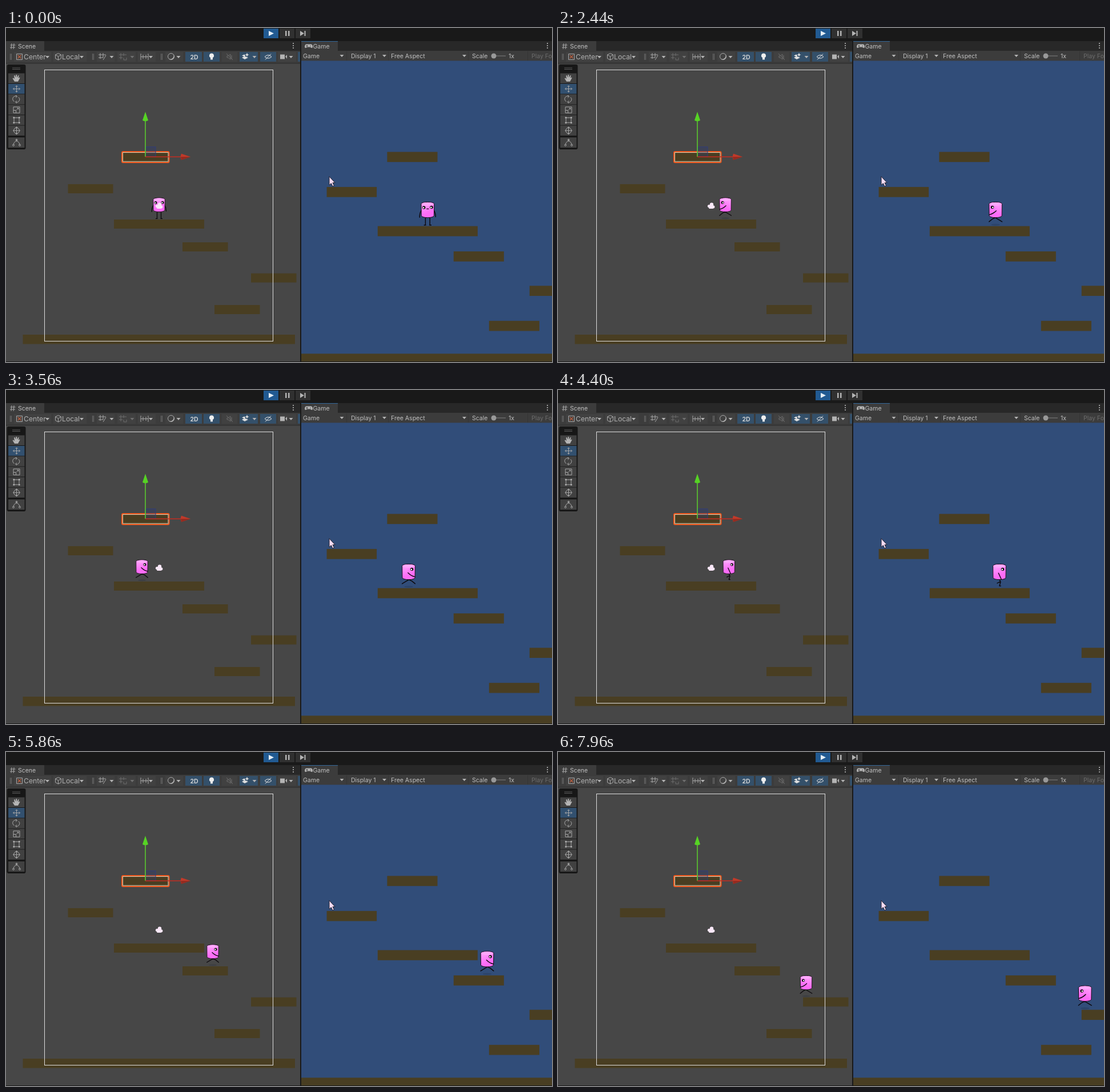
Animation, 956 px wide and 586 px high, one loop 8 s. Source, as an HTML page:

```html
<!DOCTYPE html>
<html lang="en">
<head>
<meta charset="utf-8">
<title>Platformer in the editor</title>
<style>
  html, body { margin: 0; width: 100%; height: 100%; overflow: hidden; background: #191919; }
  svg { display: block; width: 956px; height: 586px; }
  text { font: 10.5px Inter, Roboto, sans-serif; fill: #c0c0c0; }
  .big { font-size: 12.2px; fill: #b0b0b0; }
  .dim { fill: #6c6c6c; }
  .btn { fill: #414141; }
  .on { fill: #34506a; }
  .ico { fill: none; stroke: #a8a8a8; stroke-width: 1; }
  .off { stroke: #6c6c6c; }
  .fill { fill: #b4b4b4; }
  .limb { fill: none; stroke: #0c080c; stroke-width: 1.3; stroke-linecap: round; stroke-linejoin: round; }
  .plat { fill: #493e22; }
</style>
</head>
<body>
<svg viewBox="0 0 956 586">
  <defs>
    <clipPath id="gameClip"><rect x="517" y="58" width="439" height="527"/></clipPath>
    <linearGradient id="skin" x2=".3" y2="1">
      <stop offset=".2" stop-color="#ff9cfb"/><stop offset=".8" stop-color="#fd6cf7"/>
    </linearGradient>
    <path id="down" d="M0 0h7l-3.5 4z" fill="#b4b4b4"/>
    <g id="dots" fill="#c4c4c4"><circle r="1"/><circle cy="4" r="1"/><circle cy="8" r="1"/></g>

    <g id="body">
      <path d="M-10.200 -9.500Q-9 -12.300 0 -12.300Q9 -12.300 10.300 -9.500L10 9.500Q8 12.300 0 12.300Q-8 12.300 -10 9.500Z" fill="url(#skin)" stroke="#1c0b1c" stroke-width=".9"/>
      <ellipse cy="-9.200" rx="9.300" ry="2.600" fill="#ffa8fc"/>
    </g>
    <g id="eye"><circle r="2.500" fill="#0c080c"/><circle cx="-.6" cy=".3" r="1.200" fill="#fff"/></g>

    <g id="idle">
      <path class="limb" d="M-10 1Q-13 5 -12.700 12M10 1Q12.500 5 12.500 11M-3.500 12V24M3.500 12V24M-5.500 24.200H-3M3 24.200H5.500"/>
      <use href="#body"/>
      <use href="#eye" x="-6" y="-3.600"/><use href="#eye" x="6" y="-4"/>
      <path class="limb" d="M-1.500 -1.500H1.500" style="stroke-width:1"/>
    </g>
    <g id="stride">
      <ellipse cy="23.500" rx="7" ry="1.500" fill="#1d2436" opacity=".22"/>
      <path class="limb" d="M1 12L-4 15L-10.300 18.800M0 12L5 14.500L10.300 18.800"/>
      <use href="#body"/>
      <use href="#eye" x="5" y="-4"/>
      <path class="limb" d="M-1 1.500Q4 6.500 9.800 7.800"/>
    </g>
    <g id="pass">
      <path class="limb" d="M0 12L1.800 16L0 22.300H2M1.500 15.500L-3.500 18"/>
      <use href="#body"/>
      <use href="#eye" x="5" y="-4"/>
      <path class="limb" d="M-1.500 2L3 12"/>
    </g>

    <g id="world">
      <g class="plat">
        <rect x="204" y="218.500" width="79.500" height="16"/>
        <rect x="108.500" y="274" width="79" height="16"/>
        <rect x="189" y="336" width="158" height="16"/>
        <rect x="309" y="376" width="79.500" height="16"/>
        <rect x="429" y="430.500" width="79.500" height="16"/>
        <rect x="365" y="486" width="79.500" height="16"/>
        <rect x="29.500" y="538" width="476.500" height="16.500"/>
      </g>
      <use id="actor" href="#idle"/>
    </g>
  </defs>

  <!-- play bar -->
  <rect width="956" height="586" fill="#191919"/>
  <rect x="451" y="1" width="26" height="17" fill="#215a92"/>
  <rect x="479" y="1" width="26" height="17" fill="#303030"/>
  <rect x="507" y="1" width="26" height="17" fill="#303030"/>
  <g class="fill">
    <path d="M460 5l9 4.500l-9 4.500z" style="fill:#e4eef6"/>
    <path d="M489 5h2.500v9h-2.500zM494 5h2.500v9h-2.500z"/>
    <path d="M515 5l7 4.500l-7 4.500zM522.500 5h2v9h-2z"/>
  </g>

  <!-- scene panel -->
  <rect y="23" width="515" height="18" fill="#282828"/>
  <rect y="23" width="67" height="18" fill="#3c3c3c"/>
  <path class="ico" d="M10 27L9 37M14 27L13 37M7.500 30H16.500M7 34H16"/>
  <text x="21" y="36">Scene</text>
  <use href="#dots" x="503" y="27"/>
  <rect y="40" width="515" height="22" fill="#3c3c3c"/>
  <rect y="62" width="515" height="523" fill="#474747"/>
  <path d="M0 62H515" stroke="#2a2a2a"/>

  <g class="btn">
    <rect x="14" y="42" width="65" height="17"/><rect x="83" y="42" width="58" height="17"/>
    <rect x="159" y="42" width="31" height="17"/><rect x="195" y="42" width="32" height="17"/>
    <rect x="231" y="42" width="31" height="17"/><rect x="279" y="42" width="31" height="17"/>
    <rect x="378" y="42" width="27" height="17"/><rect x="476" y="42" width="32" height="17"/>
  </g>
  <g class="on">
    <rect x="314" y="42" width="29" height="17"/><rect x="346" y="42" width="28" height="17"/>
    <rect x="409" y="42" width="32" height="17"/><rect x="445" y="42" width="28" height="17"/>
    <rect x="511" y="42" width="4" height="17"/>
  </g>
  <path class="ico off" d="M7.500 45V56M9.500 45V56M151.500 45V56M153.500 45V56M271.500 45V56M273.500 45V56"/>
  <path class="ico" d="M18.500 45.500H28.500V55.500H18.500Z"/>
  <path d="M20.500 47.500L26.500 53.500M26.500 47.500L20.500 53.500" stroke="#c0603f" stroke-width="1.200"/>
  <text class="big" x="31" y="55">Center</text>
  <path class="ico" d="M91.500 44.500L96.500 47V53.500L91.500 56L86.500 53.500V47ZM86.500 47L91.500 50L96.500 47M91.500 50V56"/>
  <text class="big" x="98" y="55">Local</text>
  <path class="ico" d="M165 44V54M170 44V52M162 47H175M162 52H170M170 56L175 48"/>
  <path class="ico off" d="M201 44V55M206 44V49M198 47H211M198 52H204M206 52V56H211V52"/>
  <path class="ico" d="M236 45V56M249 45V56M236 50.500H249M240 47V54M245 47V54"/>
  <circle class="ico" cx="289" cy="50" r="5.500"/>
  <path class="fill" d="M293 46A5.500 5.500 0 0 1 285 54A6 6 0 0 0 293 46"/>
  <text x="322.500" y="54.500" style="font-weight:600;fill:#dcdcdc">2D</text>
  <path d="M360 44.500a4 4 0 0 1 2 7.500v3.500h-4v-3.500a4 4 0 0 1 2-7.500" fill="#eee"/>
  <path class="ico off" d="M387 49H389L393 46V55L389 52H387ZM395 48V54M386 45L397 56"/>
  <path d="M413 52l5-2.500l6 2.500l-6 3zM413 48.500l4-2l2 1l-1 3z" fill="#e0e0e0"/>
  <path d="M422 43.500l1 2.500l2.500 1l-2.500 1l-1 2.500l-1-2.500l-2.500-1l2.500-1z" fill="#e0e0e0"/>
  <path class="ico" d="M453 50.500Q459 44.500 465 50.500Q459 56 453 50.500M454 55.500L464 45.500" style="stroke:#e4e4e4"/>
  <path class="fill" d="M480 46.500h8v8h-8zM489 50l3-3v7z"/>
  <use href="#down" x="74" y="49" transform="translate(-5)"/><use href="#down" x="129" y="49"/>
  <use href="#down" x="181.500" y="49"/><use href="#down" x="217.500" y="49" opacity=".4"/>
  <use href="#down" x="250" y="49"/><use href="#down" x="298.500" y="49"/>
  <use href="#down" x="431.500" y="49"/><use href="#down" x="495.500" y="49"/>

  <use href="#world"/>

  <!-- scene gizmos -->
  <rect x="67.500" y="73.500" width="400" height="476" fill="none" stroke="#dedede"/>
  <g fill="#fbe8fa">
    <circle cx="269" cy="309.800" r="3.200"/><circle cx="264.500" cy="312.500" r="2.600"/>
    <circle cx="271.800" cy="313.800" r="2.600"/><rect x="264" y="311" width="8" height="6" rx="1.500"/>
  </g>
  <rect x="203" y="217" width="82.500" height="19" rx="2" fill="none" stroke="#f2581c" stroke-width="2"/>
  <rect x="204.500" y="218.500" width="79.500" height="15.700" fill="none" stroke="#cfd0b6"/>
  <rect x="244.500" y="208.500" width="17.500" height="17" fill="#2d3a72" fill-opacity=".35" stroke="#303c78"/>
  <path d="M244 226V162" stroke="#5bd22c" stroke-width="1.500"/>
  <path d="M244 147L249 162Q244 165 239 162Z" fill="#56d324"/>
  <path d="M244 226H307" stroke="#c42d20" stroke-width="1.300"/>
  <path d="M323 226L307 220.500Q304.500 226 307 231.500Z" fill="#c03a2a"/>
  <path d="M323 226L306 226L307 231.500Z" fill="#942b20"/>

  <!-- tool strip -->
  <rect x="1.500" y="64" width="33" height="149" rx="3" fill="#171717"/>
  <path d="M11 70H25M11 72.500H25" stroke="#5a5a5a"/>
  <g class="btn">
    <rect x="4" y="79.500" width="28.500" height="17.500"/>
    <rect x="4" y="98" width="28.500" height="17.500" style="fill:#32506f"/>
    <rect x="4" y="116.300" width="28.500" height="17.500"/><rect x="4" y="134.600" width="28.500" height="17.500"/>
    <rect x="4" y="153" width="28.500" height="17.500"/><rect x="4" y="171.300" width="28.500" height="17.500"/>
    <rect x="4" y="192" width="28.500" height="18"/>
  </g>
  <path class="fill" d="M15 94L11.500 88.500L13 87.500L15 89.500L14 83.500L15.500 83L17 87L17.500 82H19L19.500 87L21.500 83L22.800 83.500L21.500 88L23.500 86.500L24.500 87.500L21 94Z"/>
  <path class="ico" d="M18.500 101V112.500M12.500 106.800H24.500M16.500 103L18.500 101L20.500 103M16.500 110.500L18.500 112.500L20.500 110.500M14.500 104.800L12.500 106.800L14.500 108.800M22.500 104.800L24.500 106.800L22.500 108.800"/>
  <path class="ico" d="M14.500 129A5 5 0 0 1 19 120M22 121.500A5 5 0 0 1 17 130M17 118L19.500 120L17 122.500M19 127.500L16.500 130L19 132"/>
  <path class="ico" d="M13 138.500H24V149H13ZM13 144.500H17.500V149M18.500 143.500L22 140.500M19.500 140.500H22V143"/>
  <path class="ico" d="M14 157.500H23V166H14Z"/>
  <path class="fill" d="M12.500 156h2.500v2.500h-2.500zM22 156h2.500v2.500h-2.500zM12.500 165h2.500v2.500h-2.500zM22 165h2.500v2.500h-2.500z"/>
  <circle class="ico" cx="18.500" cy="180" r="5"/>
  <path class="ico" d="M18.500 173.500V186.500M12 180H25M16.500 175L18.500 173.500L20.500 175M16.500 185L18.500 186.500L20.500 185"/>
  <path class="ico" d="M13 205Q14 199 18.500 198.500Q23 199 24 205M18.500 195V198"/>
  <g class="ico"><circle cx="18.500" cy="196.500" r="1.500"/><circle cx="13" cy="205.500" r="1.500"/><circle cx="24" cy="205.500" r="1.500"/></g>

  <!-- game panel -->
  <rect x="517" y="23" width="439" height="18" fill="#282828"/>
  <rect x="517" y="23" width="64" height="18" fill="#3c3c3c"/>
  <path d="M517 23.500H581" stroke="#33689a"/>
  <path class="fill" d="M526 28.500h8q2.500 0 3 4q0 3-2 2.500l-2-1.500h-6l-2 1.500q-2 .5-2-2.500q.5-4 3-4"/>
  <path d="M525.500 31.500h3M527 30v3M532.500 31.500h1.500" stroke="#3c3c3c"/>
  <text x="537.500" y="36">Game</text>
  <use href="#dots" x="948" y="27"/>
  <rect x="517" y="40" width="439" height="18" fill="#3c3c3c"/>
  <text x="520" y="52.500">Game</text><use href="#down" x="584.500" y="47"/>
  <text x="604" y="52.500">Display 1</text><use href="#down" x="659" y="47"/>
  <text x="674" y="52.500">Free Aspect</text><use href="#down" x="799" y="47"/>
  <text x="816" y="52.500">Scale</text>
  <path d="M850 49H875" stroke="#5e5e5e" stroke-width="2"/>
  <circle cx="854" cy="49" r="4.500" fill="#999"/>
  <text x="880" y="52.500">1x</text>
  <text class="dim" x="920" y="52.500">Play Focused</text>
  <path d="M596.500 41V57M669.500 41V57M809.500 41V57M913.500 41V57" stroke="#353535"/>
  <rect x="517" y="57.500" width="439" height="527.500" fill="#314d79"/>
  <g clip-path="url(#gameClip)">
    <use href="#world" transform="translate(738.3 347.6) scale(1.108) translate(-268 -336)"/>
  </g>
  <path d="M566 260.500V275.500L569.400 272.500L571.900 277.800L574.400 276.600L572 271.500H576Z" fill="#f6dcf4" stroke="#1a1a24" stroke-width=".9"/>
</svg>
<script>
  const LOOP = 8000, STEP = 69.9, WALK = 970;
  const actor = document.getElementById('actor');

  // horizontal path: [time, x]
  const path = [
    [900, 268], [1740, 293], [2200, 304], [2440, 293], [2580, 283.5], [3450, 236.5],
    [3560, 238], [4260, 284.5], [4400, 299.8], [5090, 373], [5230, 378], [5780, 361.8],
    [5860, 362], [6000, 363.5], [6770, 402.5], [6910, 418], [7350, 449.5],
    [7610, 446.5], [7960, 434.5]
  ];
  const slope = i => (path[i + 1][1] - path[i][1]) / (path[i + 1][0] - path[i][0]);
  const tangent = i => {
    if (i === 0) return 0;
    if (i === path.length - 1) return slope(i - 1);
    const a = slope(i - 1), b = slope(i);
    return a * b <= 0 ? 0 : 2 * a * b / (a + b);
  };

  function xAt(t) {
    if (t <= path[0][0]) return path[0][1];
    let i = 0;
    while (i < path.length - 2 && t >= path[i + 1][0]) i++;
    const [t0, x0] = path[i], [t1, x1] = path[i + 1];
    const d = t1 - t0, u = (t - t0) / d, v = 1 - u;
    return x0 * (1 + 2 * u) * v * v + x1 * u * u * (3 - 2 * u)
      + d * (tangent(i) * u * v * v - tangent(i + 1) * u * u * v);
  }

  const drop = (t, start, height) => {
    const s = Math.max(0, t - start) / 1000;
    return Math.min(height, 52 * s * s);
  };

  function draw(time) {
    let pose = 'idle', x = 268, y = 310.2, dir = 1;
    if (time >= WALK) {
      const n = Math.floor((time - WALK + 5) / STEP);
      const t = WALK + n * STEP;
      x = xAt(t);
      y += drop(t, 4980, 40) + drop(t, 6740, 54.5);
      dir = xAt(t + 5) < x ? -1 : 1;
      pose = n % 8 < 4 ? 'pass' : 'stride';
    } else if (time >= 510) {
      y += 0.5;
    }
    actor.setAttribute('href', '#' + pose);
    actor.setAttribute('transform', `translate(${x.toFixed(2)} ${y.toFixed(2)}) scale(${dir} 1)`);
  }

  const begin = performance.now();
  function tick() {
    draw((performance.now() - begin) % LOOP);
    requestAnimationFrame(tick);
  }
  tick();
</script>
</body>
</html>
```
